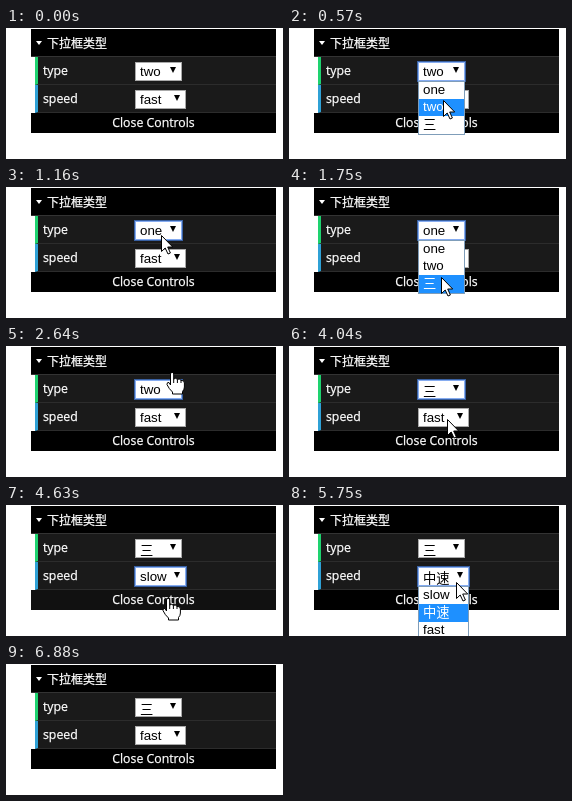
An HTML page that plays this animation: 277x131 px, repeating every 6960 ms.

```html
<!DOCTYPE html>
<html lang="zh">
<head>
<meta charset="utf-8">
<style>
html, body { margin: 0; width: 100%; height: 100%; overflow: hidden; background: #fff; }
div, svg { position: absolute; box-sizing: border-box; white-space: nowrap; }
#panel { left: 25px; top: 1px; width: 245px; height: 104px; color: #fff; -webkit-text-stroke: .25px #fff;
  font: 12.3px/27px "Open Sans", "Noto Sans CJK SC", "Noto Sans CJK", sans-serif; }
#title { width: 100%; height: 28px; padding-left: 16px; background: #000; border-bottom: 1px solid #333;
  font-family: "Noto Sans CJK SC", "Noto Sans CJK", sans-serif; font-size: 12px; }
#title::before { content: ""; position: absolute; left: 5px; top: 12px;
  border: 3px solid transparent; border-top: 4px solid #fff; border-bottom: 0; }
.row { left: 4px; width: 241px; height: 28px; padding-left: 5px; background: #1a1a1a;
  border-left: 3px solid; border-bottom: 1px solid #2c2c2c; }
#close { top: 84px; width: 100%; height: 20px; line-height: 20px; text-align: center; }
.select, .list { left: 129px; color: #000; background: #fff;
  font: 13.33px/17px "Liberation Sans", "Noto Sans CJK SC", "Noto Sans CJK", sans-serif; }
.select { height: 19px; border: 1px solid #a9a9a9; padding-left: 4px; }
.select.cjk { padding-top: 2px; }
.select::after { content: ""; position: absolute; right: 5px; top: 4px;
  border: 3.5px solid transparent; border-top: 6px solid #000; border-bottom: 0; }
.focus { border-color: #86acf0; box-shadow: 0 0 0 1px rgba(77, 144, 254, .6); }
.list { border: 1px solid #7f9db9; }
.list div { position: static; height: 17px; line-height: 15px; padding-left: 4px; }
.list .cjk { height: 18px; padding-top: 1px; }
.list .on { background: #1e90ff; color: #fff; }
svg { left: 0; top: 0; overflow: visible; fill: #fff; stroke: #000; stroke-linejoin: round; }
</style>
</head>
<body>
<div id="panel">
  <div id="title">下拉框类型</div>
  <div class="row" style="top:28px;border-left-color:#1ed36f">type</div>
  <div class="row" style="top:56px;border-left-color:#2fa1d6">speed</div>
  <div id="close">Close Controls</div>
</div>
<svg id="cursor" width="18" height="23">
  <path id="arrow" d="M.5 .5V16.5L4.2 13L7 19L9.4 18L6.7 12H11.7Z"/>
  <path id="hand" d="M-1.5 13V2A1.6 1.6 0 0 1 1.7 2V7Q3.7 5.4 5.4 7.4Q7.4 6.2 9 8.4Q12.4 8 12.4 11V15Q12.4 17.5 10.5 19.5V22H.5V20Q-3 17 -5 12.6Q-5.2 10 -3 10.5ZM1.7 7V11M5.4 7.4V11M9 8.4V11"/>
</svg>
<script>
const LOOP = 6960, ENTER = 60, LEAVE = 6500, GLIDE = 220;
const $ = id => document.getElementById(id);

// Each pick opens the list, then closes it on an option
const menus = [
  { top: 34, width: 47, options: ["one", "two", "三"], initial: 1, focus: [430, 4110],
    picks: [[430, 1160, 0], [1300, 2280, 1], [2950, 3760, 2]] },
  { top: 62, width: 51, options: ["slow", "中速", "fast"], initial: 2, focus: [4110, 6880],
    picks: [[4110, 4630, 0], [4920, 5450, 1], [5750, 6280, 2]] }
];

// Pointer moves: start time and destination, each lasting GLIDE ms
const moves = [
  [ENTER, 162, 44], [430, 150, 84], [710, 155, 62], [930, 155, 48],
  [1450, 152, 90], [1750, 152, 80], [2200, 166, 26], [2660, 162, 42],
  [3200, 147, 92], [3770, 158, 73], [4180, 162, 93], [4640, 165, 72],
  [4940, 160, 104], [5310, 167, 77], [5760, 165, 118], [6270, 198, 110]
];

const within = (t, [from, to]) => t >= from && t < to;

function add(parent, cls, style = {}) {
  const el = document.createElement("div");
  el.className = cls;
  Object.assign(el.style, style);
  parent.append(el);
  return el;
}

function setText(el, text) {
  el.textContent = text;
  el.classList.toggle("cjk", text > "z");
}

for (const cls of ["select", "list"])
  for (const m of menus)
    m[cls] = add(document.body, cls, {
      top: m.top + (cls === "list" ? 19 : 0) + "px", width: m.width + "px"
    });
for (const m of menus) m.options.forEach(text => setText(add(m.list, ""), text));
document.body.append($("cursor"));

function pointer(t) {
  let x = 211, y = 23;
  for (const [start, toX, toY] of moves) {
    const k = Math.min(1, Math.max(0, (t - start) / GLIDE));
    const ease = k * k * (3 - 2 * k);
    x += (toX - x) * ease;
    y += (toY - y) * ease;
  }
  return [Math.round(x), Math.round(y)];
}

function draw(now) {
  const t = now % LOOP, [x, y] = pointer(t);
  let anyOpen = false;
  for (const m of menus) {
    const last = m.picks.filter(p => p[1] <= t).pop();
    const value = last ? last[2] : m.initial;
    const open = m.picks.some(p => within(t, p));
    const row = Math.floor((y - m.top - 20) / 17);
    const active = m.options[row] ? row : value;
    anyOpen ||= open;
    setText(m.select, m.options[value]);
    m.select.classList.toggle("focus", within(t, m.focus));
    m.list.style.display = open ? "" : "none";
    [...m.list.children].forEach((el, i) => el.classList.toggle("on", i === active));
  }
  const shown = within(t, [ENTER, LEAVE]);
  const onClose = shown && !anyOpen && within(y, [85, 105]);
  const hand = onClose || !anyOpen && y < 29;
  $("close").style.background = onClose ? "#111" : "#000";
  $("cursor").style.display = shown ? "" : "none";
  $("cursor").style.transform = `translate(${x}px, ${y}px)`;
  $("hand").style.display = hand ? "" : "none";
  $("arrow").style.display = hand ? "none" : "";
}

function tick() {
  draw(performance.now() - begin);
  requestAnimationFrame(tick);
}

const begin = performance.now();
tick();
</script>
</body>
</html>
```
